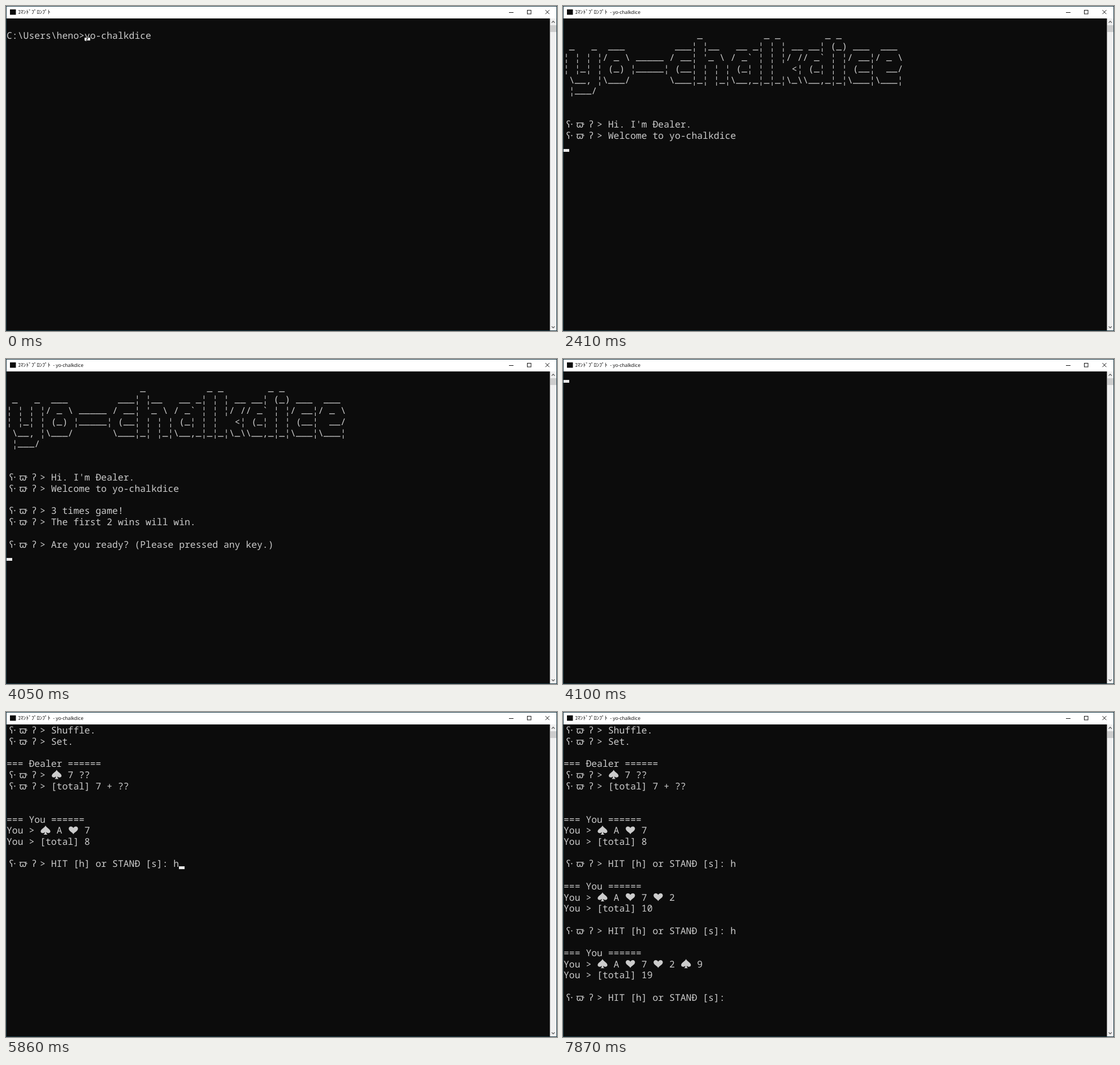
Animation, 975 px wide and 575 px high, one loop 8000 ms. Source, as an HTML page:

```html
<!DOCTYPE html>
<html lang="ja">
<head>
<meta charset="utf-8">
<title>Console</title>
<style>
  html, body { margin: 0; width: 100%; height: 100%; overflow: hidden; background: #0c0c0c; }
  svg { display: block; width: 975px; height: 575px; }
  text { white-space: pre; text-rendering: geometricPrecision; }
  #screen { fill: #ccc; font: 16.42px "Noto Sans Mono", "DejaVu Sans Mono", monospace; font-variant-ligatures: none; }
  #screen .face { font-family: "Noto Sans", "DejaVu Sans", sans-serif; text-anchor: middle; }
  #cursor { fill: #f6f6f6; mix-blend-mode: difference; }
  #kana { font: 9.6px "Noto Sans CJK JP", "Noto Sans CJK", sans-serif; }
  #app { font: 8.5px "Open Sans", "Noto Sans", sans-serif; }
</style>
</head>
<body>
<svg viewBox="0 0 975 575" xmlns="http://www.w3.org/2000/svg">
  <rect width="975" height="575" fill="#0c0c0c"/>
  <g id="screen"></g>
  <rect id="cursor" width="10" height="5"/>

  <rect width="975" height="22" fill="#fff"/>
  <rect x="7" y="6" width="10.5" height="9.5" fill="#0c0c0c"/>
  <text id="kana" x="21" y="14.2">ｺﾏﾝﾄﾞﾌﾟﾛﾝﾌﾟﾄ</text>
  <text id="app" x="81" y="14"></text>
  <g fill="none" stroke="#111" stroke-width="1">
    <path d="M890 11.5h8"/>
    <rect x="922.5" y="7.5" width="6.5" height="6.5"/>
    <path d="M954.5 7.2l7 7M961.5 7.2l-7 7"/>
  </g>

  <rect x="962.5" y="22" width="12" height="552" fill="#f0f0f0"/>
  <rect x="963" y="34" width="11" height="12" fill="#cdcdcd"/>
  <path d="M965.6 29.6l2.7-2.7 2.7 2.7M965.6 566.8l2.7 2.7 2.7-2.7" fill="none" stroke="#505050" stroke-width="1.2"/>
  <rect x=".5" y=".5" width="974" height="574" fill="none" stroke="#1b3b47"/>
</svg>
<script>
const LOOP = 8000, CELL_W = 9.85, CELL_H = 19.7, LEFT = 1, TOP = 22, BASELINE = 16;
const APP = "yo-chalkdice";
const $ = id => document.getElementById(id);
const screen = $("screen"), cursor = $("cursor");

const SUITS = {
  "♠": "M0 1.4C1.4 5.2 8.6 8 8.6 12C8.6 15.4 4 16.2 1.3 13.2C1.4 15.4 2 16.8 3.6 17.6H-3.6C-2 16.8-1.4 15.4-1.3 13.2C-4 16.2-8.6 15.4-8.6 12C-8.6 8-1.4 5.2 0 1.4Z",
  "♥": "M0 17C-1.6 13.6-8.2 11.4-8.2 7C-8.2 2.6-2 1.8 0 6C2 1.8 8.2 2.6 8.2 7C8.2 11.4 1.6 13.6 0 17Z"
};
const FACE = [["ʕ", 9.5], ["·", 15.5], ["ϖ", 30], ["·", 36.5], ["ʔ", 50]];

const LOGO = [
  "                        _           _ _        _ _",
  " _   _  ___         ___| |__   __ _| | | __ __| (_) ___  ___",
  "| | | |/ _ \\ _____ / __| '_ \\ / _` | | |/ // _` | |/ __|/ _ \\",
  "| |_| | (_) |_____| (__| | | | (_| | |   <| (_| | | (__|  __/",
  " \\__, |\\___/       \\___|_| |_|\\__,_|_|_|\\_\\\\__,_|_|\\___|\\___|",
  " |___/"
];

// Screens are arrays of rows; "@" is the dealer's face, six columns wide.
const ASK = "@> HIT [h] or STANÐ [s]: ";
const hand = (cards, total) => ["=== You ======", "You > " + cards, "You > [total] " + total, "", ASK];
const typed = rows => [...rows.slice(0, -1), rows.at(-1) + "h"];

const command = ["", "C:\\Users\\heno>" + APP];
const hello = ["", ...LOGO, "", "", "@> Hi. I'm Ðealer.", "@> Welcome to " + APP];
const ready = [...hello, "", "@> 3 times game!", "@> The first 2 wins will win.", "",
  "@> Are you ready? (Please pressed any key.)"];
const deal = ["@> Shuffle.", "@> Set.", "", "=== Ðealer ======", "@> ♠ 7 ??", "@> [total] 7 + ??"];
const turn1 = [...deal, "", "", ...hand("♠ A ♥ 7", 8)];
const hit1 = typed(turn1);
const turn2 = [...hit1, "", ...hand("♠ A ♥ 7 ♥ 2", 10)];
const hit2 = typed(turn2);
const turn3 = [...hit2, "", ...hand("♠ A ♥ 7 ♥ 2 ♠ 9", 19)];

// start time, rows, cursor position [row, column] when lit
const STEPS = [
  [0, command, [1, 14]],
  [30, command],
  [520, command, [1, 14]],
  [1030, command],
  [1540, command, [1, 14]],
  [1640, command, [2, 0]],
  [1670, command, [2, 0]],
  [2100, command],
  [2410, hello, [11, 0]],
  [2930, ready, [15, 49]],
  [3640, ready],
  [4050, ready, [16, 0]],
  [4100, [], [0, 0]],
  [4150, deal, [7, 0]],
  [4620, turn1, [12, 30]],
  [5260, turn1],
  [5770, turn1, [12, 30]],
  [5860, hit1, [12, 31]],
  [6100, turn2, [18, 30]],
  [6790, turn2],
  [6890, hit2, [18, 31]],
  [7020, turn3, [24, 30]],
  [7870, turn3]
];
const TITLE_TIME = 1670;

const colX = col => LEFT + col * CELL_W;
const rowY = row => TOP + row * CELL_H;

function add(tag, attrs, content = "") {
  const el = document.createElementNS("http://www.w3.org/2000/svg", tag);
  for (const name in attrs) el.setAttribute(name, attrs[name]);
  el.textContent = content;
  screen.append(el);
}

function drawRow(source, row) {
  const y = rowY(row) + BASELINE;
  if (LOGO.includes(source)) {
    // Underscores sit close to the baseline, bars are broken.
    add("text", { x: LEFT, y }, source.replace(/_/g, " ").replace(/\|/g, "¦"));
    add("text", { x: LEFT, y: y - 1.8 }, source.replace(/[^_]/g, " "));
    return;
  }
  const cells = source.replace("@", "@     ").replace(/[♠♥]/g, "$& ");
  add("text", { x: LEFT, y }, cells.replace(/[@♠♥]/g, " "));
  [...cells].forEach((ch, col) => {
    if (ch === "@") for (const [glyph, x] of FACE) add("text", { class: "face", x, y }, glyph);
    if (SUITS[ch]) add("path", { d: SUITS[ch], transform: `translate(${colX(col + 1)} ${rowY(row)})` });
  });
}

let shownRows, shownStep;

function render(time) {
  const step = STEPS.findLast(s => s[0] <= time);
  if (step === shownStep) return;
  shownStep = step;
  const [start, rows, spot] = step;
  if (rows !== shownRows) {
    shownRows = rows;
    screen.replaceChildren();
    rows.forEach(drawRow);
  }
  cursor.style.display = spot ? "" : "none";
  if (spot) {
    cursor.setAttribute("x", Math.round(colX(spot[1])));
    cursor.setAttribute("y", Math.round(rowY(spot[0] + 1)) - 5);
  }
  $("app").textContent = start >= TITLE_TIME ? " - " + APP : "";
}

const origin = performance.now();
function tick() {
  render((performance.now() - origin) % LOOP);
  requestAnimationFrame(tick);
}
tick();
</script>
</body>
</html>
```
